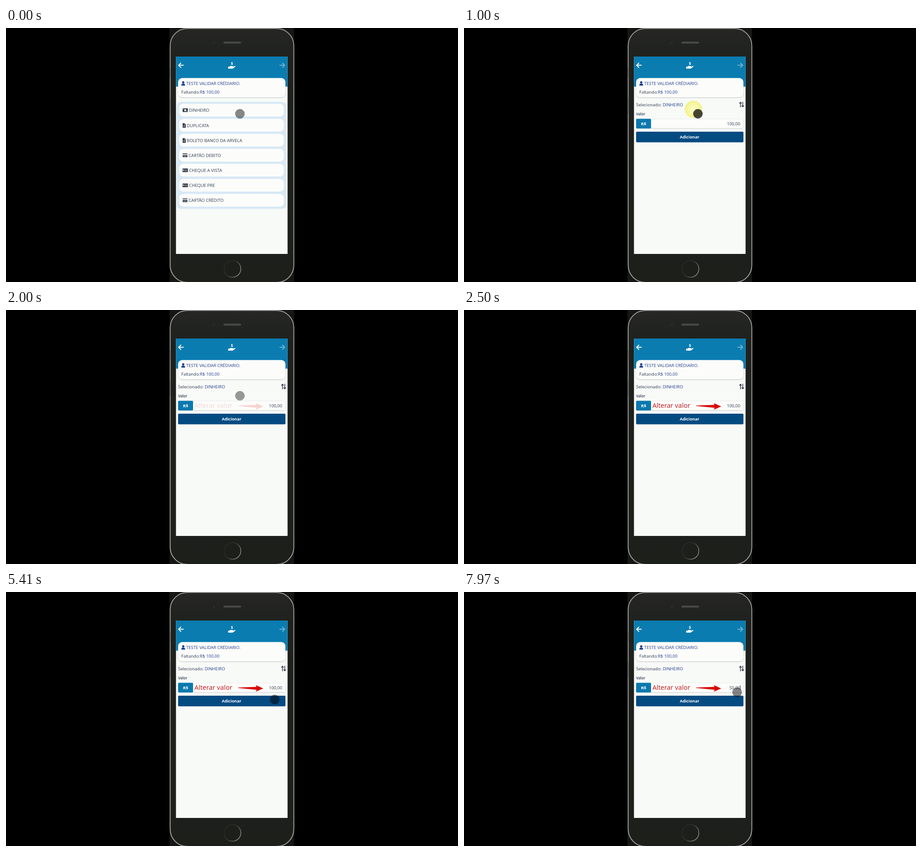
These frames come from a looping animation (998x561 px, 8000 ms). An HTML page:

```html
<!DOCTYPE html>
<html lang="pt-BR">
<head>
<meta charset="utf-8">
<style>
  html, body { margin: 0; width: 100%; height: 100%; overflow: hidden; background: #000; }
  svg { display: block; width: 100vw; height: 100vh; }
  text { font: 9.5px "Open Sans", sans-serif; fill: #2c3a50; white-space: pre; }
  .navy { fill: #233c8e; }
  .bold { font-weight: 700; font-size: 9px; fill: #fff; text-anchor: middle; }
  .line { fill: none; stroke: #fff; stroke-width: 2; stroke-linecap: round; stroke-linejoin: round; }
</style>
</head>
<body>
<svg viewBox="0 0 998 561">
  <defs>
    <linearGradient id="body" x2="0" y2="1">
      <stop stop-color="#262725"/><stop offset=".12" stop-color="#1f211e"/><stop offset="1" stop-color="#1d1f1b"/>
    </linearGradient>
    <linearGradient id="home" x2="1" y2=".6">
      <stop stop-color="#232521"/><stop offset=".55" stop-color="#32342f"/><stop offset="1" stop-color="#85867f"/>
    </linearGradient>
    <radialGradient id="glow">
      <stop stop-color="#fcfcc0"/><stop offset=".6" stop-color="#f7f79c"/><stop offset="1" stop-color="#f0f07c"/>
    </radialGradient>
    <filter id="shadow" x="-10%" y="-20%" width="120%" height="150%">
      <feDropShadow dx="0" dy="1" stdDeviation="1.3" flood-color="#234" flood-opacity=".28"/>
    </filter>
  </defs>

  <!-- phone -->
  <path fill="#161715" d="M361 0h275v561H361z"/>
  <rect x="362.5" y="1" width="273" height="561" rx="38" fill="url(#body)" stroke="#9b9c9a" stroke-width="2"/>
  <path stroke="#555" stroke-width="1.5" d="M361.7 89v20M361.7 154v36"/>
  <rect x="480" y="30" width="39" height="4.5" rx="2.2" fill="#474845"/>
  <circle cx="459" cy="32.5" r="1.5" fill="#353840"/>
  <circle cx="500" cy="532" r="18.5" fill="none" stroke="url(#home)" stroke-width="1.7"/>

  <!-- app -->
  <path fill="#f8faf7" d="M375.3 63h246.4v436H375.3z"/>
  <path fill="#0a7cb0" d="M375.3 63h246.4v66.5H375.3z"/>
  <path class="line" d="M391.5 82.3H381.5M386 77.5l-4.8 4.8 4.8 4.8"/>
  <path class="line" opacity=".42" d="M604.5 82.3h10.5M610.5 77.5l4.8 4.8-4.8 4.8"/>
  <text x="499" y="81.5" class="bold" style="font-size:8.5px">$</text>
  <path fill="#fff" d="M490.5 85.5h2.2q3-2.6 5.5-1.5h3q1.4 1.6-.8 2.1h-2.4 3.2l4-2.4q2.2.2 1 1.9l-4.6 3.5q-1 .7-2.4.7h-8.7z"/>
  <rect x="380" y="110.5" width="237" height="42.5" rx="9" fill="#fcfdfb" filter="url(#shadow)"/>
  <g fill="#1f3f93"><circle cx="391.3" cy="120" r="2.6"/><path d="M387.2 127.3v-1.2q0-3 3-3h2.2q3 0 3 3v1.2z"/></g>
  <text x="398" y="126" class="navy">TESTE VALIDAR CRÉDIARIO.</text>
  <text x="387" y="145">Faltando:<tspan class="navy">R$ 100,00</tspan></text>

  <g id="list"><rect x="377.5" y="163" width="241" height="236.5" rx="8" fill="#d8e9f6"/></g>

  <g id="form">
    <text x="380" y="173">Selecionado: <tspan class="navy">DINHEIRO</tspan></text>
    <path class="line" style="stroke:#303a4c;stroke-width:1.5" d="M610.5 174.5v-10.5M608.3 166.4l2.2-2.6 2.2 2.6M615.5 163.5v10.5M613.3 171.6l2.2 2.6 2.2-2.6"/>
    <text x="380" y="193" style="font-size:8.1px;font-weight:600">Valor</text>
    <rect x="380.5" y="201" width="236" height="21" rx="2" fill="#fcfdfb" stroke="#e3e7e9" stroke-width=".8"/>
    <path stroke="#cdd3d6" d="M413 222h202"/>
    <rect x="380" y="200.5" width="33" height="21.5" rx="2" fill="#0a79ae"/>
    <text x="396.7" y="214.6" class="bold" style="font-size:9.6px">R$</text>
    <text id="amount" x="610" y="214.6" text-anchor="end"></text>
    <path id="caret" stroke="#333" stroke-width=".9" d="M610.2 206v10.5"/>
    <rect x="380" y="229" width="237" height="23.5" rx="2" fill="#044b82"/>
    <text x="498" y="244.3" class="bold">Adicionar</text>
  </g>

  <g id="note">
    <text x="416" y="215.5" style="font-size:14.6px;fill:#bd1319">Alterar valor</text>
    <path fill="#d90606" d="M512.5 211l40.5-1.5-1.5-3.8 16.5 7.3-16.5 7.3 2-4.2-41-4z"/>
  </g>

  <circle id="click" fill="url(#glow)"/>
  <circle id="cursor" r="10.4" stroke="#000" stroke-opacity=".13" stroke-width="1"/>
</svg>

<script>
const LOOP = 8000;
const [list, form, amount, caret, note, click, cursor] =
  ['list', 'form', 'amount', 'caret', 'note', 'click', 'cursor'].map(id => document.getElementById(id));

const icons = {
  money: [404, 'M390 177.5h11.5v8H390zM395.7 179.2a2.3 2.3 0 1 0 .1 0zM391 179h1.5v1H391zM399 183h1.5v1H399z'],
  file: [399, 'M390 177h4.5l2.5 2.5v7.7h-7zM391.5 182h4v.8h-4zM391.5 184h4v.8h-4zM394 178v2h2z'],
  card: [403, 'M390 177.5h10.5v8.2H390zM390 179.3h10.5v1.9H390zM391.5 183.3h2v.9h-2zM394.5 183.3h3v.9h-3z'],
  cheque: [404, 'M390 177.7h11.7v8H390zM391.3 180h2v2.8h-2zM395 180.2h2v.8h-2zM395 182.4h5.2v.8H395zM398.3 180.2h2v.8h-2z']
};
const rows = [
  ['money', 'DINHEIRO'], ['file', 'DUPLICATA'], ['file', 'BOLETO BANCO DA ARVELA'], ['card', 'CARTÃO DEBITO'],
  ['cheque', 'CHEQUE A VISTA'], ['cheque', 'CHEQUE PRE'], ['card', 'CARTÃO CRÉDITO']
];
list.innerHTML += rows.map(([icon, label], i) => {
  const [x, path] = icons[icon];
  return `<g transform="translate(0 ${i * 33.15})">
    <rect x="382.5" y="167.5" width="231" height="28" rx="9" fill="#fcfdfb"/>
    <path d="${path}" fill="#303a46" fill-rule="evenodd"/>
    <text x="${x}" y="185.4">${label}</text></g>`;
}).join('');

const clamp = v => Math.max(0, Math.min(1, v));
const ramp = (t, from, to) => clamp((t - from) / (to - from));
const smooth = v => v * v * (3 - 2 * v);
const show = (el, on) => el.setAttribute('opacity', +on);
const place = (el, x, y) => { el.setAttribute('cx', x); el.setAttribute('cy', y); };

// Pointer path: time, x, y
const path = [
  [4540, 643, 297], [4670, 636, 302], [5000, 590, 242],
  [5240, 586, 222], [5450, 594, 239], [5840, 603, 221.3]
];
// Each keystroke shifts the digits of the currency field
const values = [[0, '100,00'], [6170, ''], [7070, '0,05'], [7220, '0,50'], [7400, '5,00'], [7740, '50,00']];
const clicks = [800, 6070];

function pointer(t) {
  if (t < 4540) return [516.5, 189.5];
  const i = path.findIndex(p => p[0] > t);
  if (i < 0) return path.at(-1).slice(1);
  const [a, b] = [path[i - 1], path[i]];
  const k = smooth(ramp(t, a[0], b[0]));
  return [a[1] + (b[1] - a[1]) * k, a[2] + (b[2] - a[2]) * k];
}

function draw(t) {
  show(list, t < 870);
  show(form, t >= 870);
  const fade = ramp(t, 1900, 2500);
  show(note, fade);
  amount.textContent = values.findLast(v => v[0] <= t)[1];
  show(caret, t >= 6400);

  const [x, y] = pointer(t);
  const age = t - (clicks.findLast(c => c <= t) ?? -LOOP);
  const burst = ramp(age, 300, 600);
  place(cursor, x, y);
  show(cursor, t < 4540 ? 1 - fade : 1);
  cursor.setAttribute('fill-opacity', age < 400 ? .72 : .47);
  place(click, x - 10, y - 10);
  click.setAttribute('r', 19 * smooth(ramp(age, 0, 130)) + 9 * burst);
  show(click, .9 * (1 - burst));
}

function tick() {
  draw(performance.now() % LOOP);
  requestAnimationFrame(tick);
}
tick();
</script>
</body>
</html>
```
